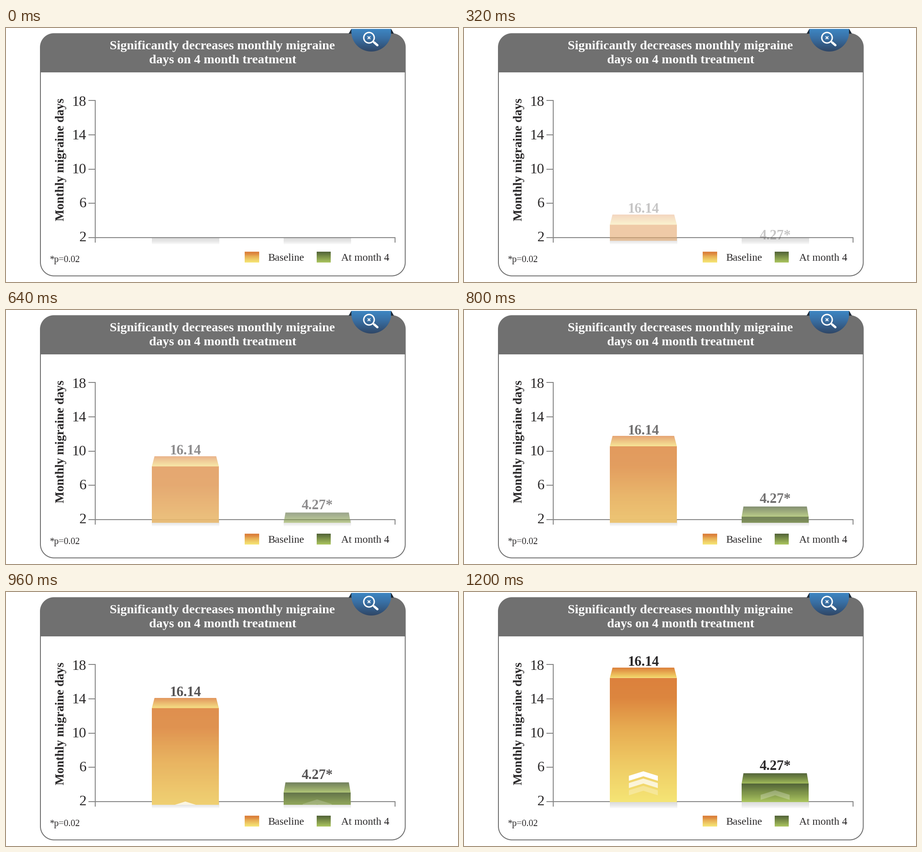
Animation of 998x561 px, one loop 8000 ms. Source, as a matplotlib script:

```python
import numpy as np
import matplotlib.pyplot as plt
from matplotlib.animation import FuncAnimation
from matplotlib.colors import to_rgb
from matplotlib.patches import Circle, Polygon, Rectangle
from matplotlib.path import Path
from matplotlib.transforms import Affine2D, Bbox, TransformedBbox

W, H, DPI = 998, 561, 64
PT = 72 / DPI            # points per pixel
RISE = 30                # frames the bars take to rise
BASE = 463               # height of the x axis
GREY, AXIS, INK = "#707070", "#868686", "#2a2829"

ORANGE = [(0, "#dc813d"), (0.16, "#dd863f"), (0.4, "#e7ab51"),
          (0.7, "#efcb65"), (1, "#f5e575")]
GREEN = [(0, "#536439"), (0.5, "#7f954a"), (1, "#aac45f")]
ORANGE_FACE = [(0, "#dc813d"), (0.5, "#e8ae52"), (1, "#f3d96c")]
GREEN_FACE = [(0, "#536439"), (0.5, "#778c47"), (1, "#9fb95a")]

fig = plt.figure(figsize=(W / DPI, H / DPI), dpi=DPI, facecolor="white")
ax = fig.add_axes([0, 0, 1, 1])
ax.set_xlim(0, W)
ax.set_ylim(H, 0)
ax.axis("off")


def band(top, bottom):
    """Clip box across the whole stage between two heights."""
    box = Bbox.from_extents(0, 1 - bottom / H, 1, 1 - top / H)
    return TransformedBbox(box, fig.transFigure)


def arc(cx, cy, r, start, end, n=40):
    t = np.linspace(start, end, n)
    return np.column_stack([cx + r * np.cos(t), cy + r * np.sin(t)])


def gradient(x0, x1, y0, y1, stops, zorder, transform=None):
    """Vertical gradient; stops are (position, colour) pairs."""
    pos = [p for p, _ in stops]
    rgb = np.array([to_rgb(c) for _, c in stops])
    t = np.linspace(0, 1, max(2, round(y1 - y0)))
    column = np.stack([np.interp(t, pos, ch) for ch in rgb.T], axis=1)
    return ax.imshow(column[:, None, :], extent=(x0, x1, y1, y0),
                     aspect="auto", interpolation="nearest", zorder=zorder,
                     transform=transform or ax.transData)


def text(x, y, s, size, weight="normal", color=INK, ha="left", **kw):
    return ax.text(x, y, s, fontsize=size * PT, family="Liberation Serif",
                   weight=weight, color=color, ha=ha, va="baseline", **kw)


def line(xs, ys, width=2, color=AXIS, cap="butt", zorder=2):
    ax.plot(xs, ys, color=color, lw=width * PT, solid_capstyle=cap,
            solid_joinstyle="miter", zorder=zorder)


def draw_card():
    x0, x1, y0, y1, r = 76, 881.5, 12.5, 547.5, 30
    centres = [(x1 - r, y1 - r), (x0 + r, y1 - r),
               (x0 + r, y0 + r), (x1 - r, y0 + r)]
    shape = np.vstack([arc(cx, cy, r, i * np.pi / 2, (i + 1) * np.pi / 2)
                       for i, (cx, cy) in enumerate(centres)])
    head = ax.add_patch(Polygon(shape, fc=GREY, lw=0, zorder=0.5))
    head.set_clip_box(band(0, 98))
    ax.add_patch(Polygon(shape, fc="none", ec=GREY, lw=2 * PT, zorder=0.6))
    for y, s in ((47, "Significantly decreases monthly migraine"),
                 (77.5, "days on 4 month treatment")):
        text(478, y, s, 28.2, "bold", "white", "center")


def draw_badge():
    cx, cy, r, top = 806.5, 8, 44, 2
    for side in (-1, 1):
        ax.add_patch(Polygon([(cx + side * 44, top), (cx + side * 50, 12.5),
                              (cx + side * 36, 12.5)], fc="#1d2a38", lw=0,
                             zorder=1))
    a = np.arcsin((top - cy) / r)
    disc = gradient(cx - r, cx + r, top, cy + r,
                    [(0, "#3d86c2"), (0.4, "#3970a5"), (1, "#2f4767")], 1.5)
    disc.set_clip_path(Path(arc(cx, cy, r, a, np.pi - a)), ax.transData)
    gx, gy = 801.5, 21.5
    ax.add_patch(Circle((gx, gy), 11.6, fc="none", ec="white", lw=3 * PT,
                        zorder=3))
    line([gx + 9, 812.5], [gy + 8.5, 32], 3, "white", zorder=3)
    line([813, 820], [32, 38], 5, "white", "round", 3)
    for d in (-3, 3):
        line([gx - 3, gx + 3], [gy - d, gy + d], 2, "white", zorder=3)


def draw_axes():
    for i, value in enumerate((18, 14, 10, 6, 2)):
        y = 160 + 75.75 * i
        line([182, 197], [y, y])
        text(177.5, 171.5 + 74.9 * i, str(value), 32, ha="right")
    line([197, 197], [159, 474])
    line([197, 859.5, 859.5], [BASE, BASE, 474])
    text(128, 426, "Monthly migraine days", 27.3, "bold", rotation=90,
         rotation_mode="anchor")


def draw_legend():
    text(96, 517, "*p=0.02", 20.3)
    gradient(527, 559, 494, 518, ORANGE, 1)
    text(578.5, 514.5, "Baseline", 23.2)
    gradient(686, 716.5, 494, 518, GREEN, 1)
    text(740.5, 514.5, "At month 4", 23.3)


class Bar:
    """Bar with a slanted top that slides up from behind a mask."""

    def __init__(self, x0, top, step, inset, label, gap, front, face, tint,
                 chevrons):
        self.step = step
        self.shift = Affine2D()
        move = self.shift + ax.transData
        x1, mid, edge, foot = x0 + 148, x0 + 74, top + 23, BASE + 0.5

        gradient(x0, x1 + 1, BASE + 1, 479,
                 [(0, "#dcdcdc"), (0.6, "#ececec"), (1, "#ffffff")], 1)
        self.under = ax.add_patch(Rectangle(
            (x0, edge), x1 - x0, foot - edge, fc=tint, lw=0, zorder=3,
            transform=move))
        self.front = gradient(x0, x1, edge, foot, front, 4, move)
        self.face = gradient(x0, x1, top, edge, face, 4, move)
        slope = [(x0, edge), (x0 + inset, top), (x1 - inset, top), (x1, edge)]
        self.face.set_clip_path(Path(slope), move)
        self.label = text(mid, top - gap, label, 30.7, "bold", ha="center",
                          transform=move, clip_on=True, zorder=7)
        self.marks = []
        for y, alpha in chevrons:
            shape = [(mid, y), (mid + 32, y + 10), (mid + 32, y + 21),
                     (mid, y + 11), (mid - 32, y + 21), (mid - 32, y + 10)]
            mark = ax.add_patch(Polygon(shape, fc="white", lw=0, zorder=6,
                                        transform=move))
            self.marks.append((mark, alpha))
        for part in (self.under, self.front, self.face, self.label,
                     *(m for m, _ in self.marks)):
            part.set_clip_box(band(0, 470))

    def pose(self, k):
        a = k / RISE
        self.shift.clear().translate(0, self.step * (RISE - k))
        self.under.set_alpha(1 - (1 - a) ** 2)   # tint leads the colour
        self.front.set_alpha(a)
        self.face.set_alpha(a ** 0.85)
        self.label.set_alpha(a)
        for mark, alpha in self.marks:
            mark.set_alpha(alpha * a)


draw_card()
draw_badge()
draw_axes()
draw_legend()
bars = [
    Bar(322, 166.75, 11.125, 6, "16.14", 3.5, ORANGE, ORANGE_FACE, "#edc896",
        [(396, 1), (412, 0.75), (428, 0.28)]),
    Bar(613, 400.3, 3.36, 4, "4.27*", 7.5, GREEN, GREEN_FACE, "#a8b48a",
        [(438, 0.25)]),
]


def update(i):
    for bar in bars:
        bar.pose(min(i, RISE))
    return []


anim = FuncAnimation(fig, update, frames=200, interval=40, repeat=True,
                     repeat_delay=0, blit=False)
plt.show()
```
